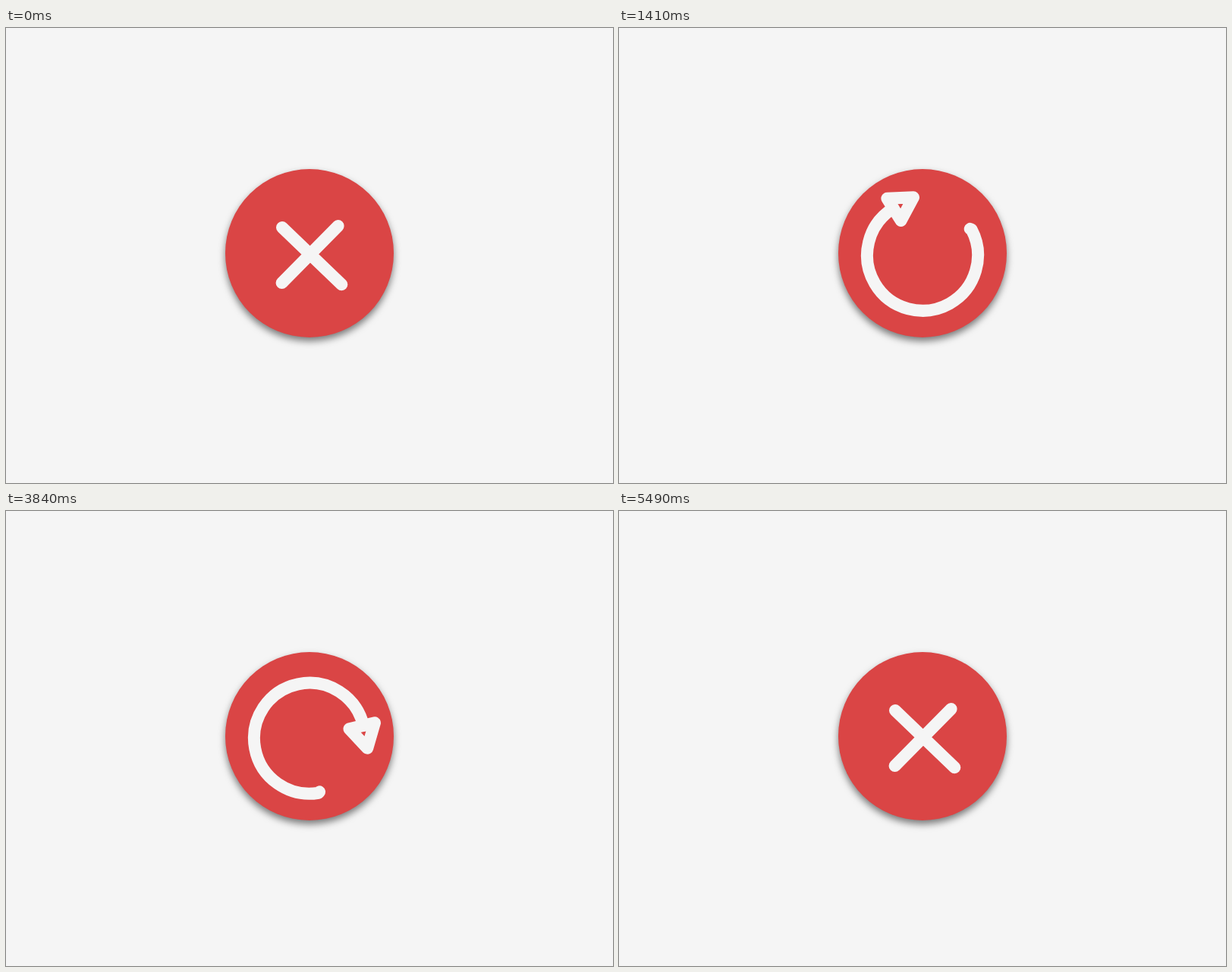
These frames come from a looping animation (800x600 px, 6.75 s). An HTML page:

```html
<!DOCTYPE html>
<html lang="en">
<head>
<meta charset="utf-8">
<title>Close to refresh</title>
<style>
  html, body { margin: 0; width: 100%; height: 100%; overflow: hidden; background: #f5f5f5; }
  .button {
    position: absolute; left: 288.7px; top: 185.9px; width: 222.6px; height: 222.6px;
    border-radius: 50%; background: #da4545; box-shadow: 0 5px 10px rgba(0, 0, 0, .5);
  }
  svg { position: absolute; left: 0; top: 0; }
  path {
    fill: none; stroke: #f5f5f5; stroke-width: 16;
    stroke-linecap: round; stroke-linejoin: round;
  }
</style>
</head>
<body>
<div class="button"></div>
<svg width="800" height="600">
  <g id="icon">
    <!-- Each stroke of the cross runs on into its part of the refresh arrow. -->
    <path id="ring" d="M-36-36.7 L42.3 38.5 Q50 46 48.7 54.4 A73 73 0 1 1 50.9-52.3"/>
    <path id="head" d="M-36.4 36.4 L37.6-38.6 L61.6-63.3 L71.3-30 L37.6-38.6"/>
  </g>
</svg>
<script>
const LOOP = 6750, STEP = 30;
const MORPH_TIME = 600, MORPH_BACK = 4890;
const SPIN_TIME = 810, SPINS = [840, 2280, 3690];

const icon = document.getElementById('icon');

// crossLength: visible part in the cross; arrowStart: where the arrow's part begins
function makeStroke(id, crossLength, arrowStart) {
  const path = document.getElementById(id);
  return { path, crossLength, arrowStart, total: path.getTotalLength() };
}

const strokes = [
  makeStroke('ring', 108.6, 124.5),
  makeStroke('head', 105.4, 105.4)
];

function ease(time, start, duration) {
  const x = Math.min(1, Math.max(0, (time - start) / duration));
  return x * x * (3 - 2 * x);
}

function trim({ path, crossLength, arrowStart, total }, morph) {
  const start = arrowStart * morph;
  const end = crossLength + (total - crossLength) * morph;
  path.style.strokeDasharray = `${end - start} 2000`;
  path.style.strokeDashoffset = -start;
}

function draw(now) {
  const time = Math.floor(now % LOOP / STEP) * STEP;
  const morph = ease(time, 0, MORPH_TIME) - ease(time, MORPH_BACK, MORPH_TIME);
  const turns = SPINS.reduce((sum, start) => sum + ease(time, start, SPIN_TIME), 0);
  strokes.forEach(stroke => trim(stroke, morph));
  icon.setAttribute('transform', `translate(400 299.7) rotate(${turns % 1 * 360})`);
  requestAnimationFrame(draw);
}

draw(performance.now());
</script>
</body>
</html>
```
